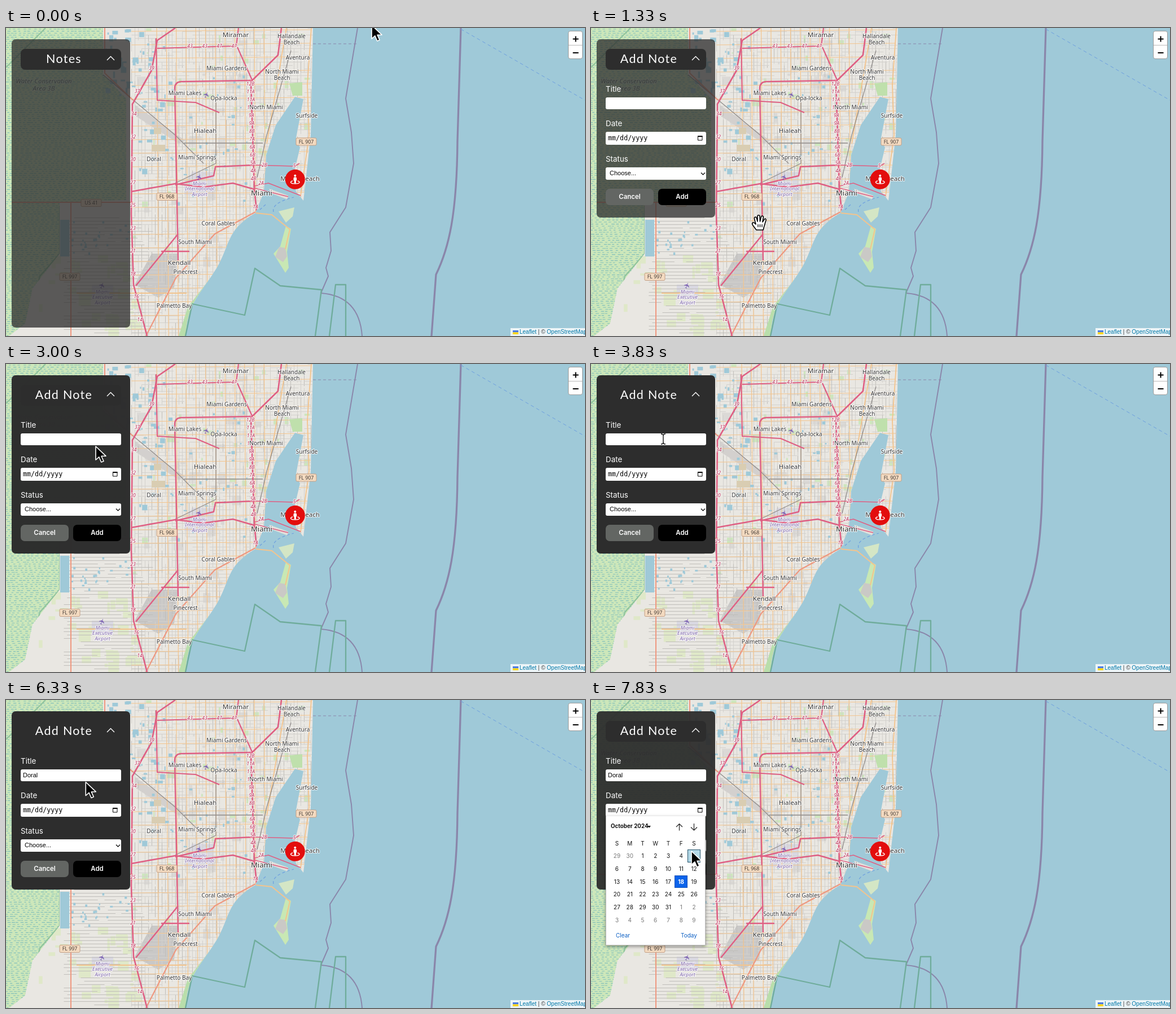
Write an HTML page with a canvas that moves like this. It is 1026x546 px and loops after 8 s.

```html
<!DOCTYPE html>
<html lang="en">
<head>
<meta charset="utf-8">
<title>Map notes</title>
<style>
html, body { margin: 0; width: 100%; height: 100%; overflow: hidden; }
body { position: relative; background: #9fc9d8; font: 13.4px Inter, sans-serif; color: #fff; }
body *, canvas { position: absolute; box-sizing: border-box; }
svg { left: 0; top: 0; }
#panel { left: 10px; top: 20px; width: 210px; border-radius: 7px; }
#head { left: 16px; top: 17px; width: 178px; height: 37px; border-radius: 8px; background: #2d2d2d; }
#name { width: 153px; text-align: center; font: 21.5px/35px Lato, cursive; letter-spacing: 1.3px; white-space: nowrap; }
#form { width: 210px; height: 316px; }
#form > * { left: 16px; line-height: 20px; }
#form .in { width: 178px; height: 22px; border-radius: 3px; background: #fff; color: #000; padding-left: 4px; font: 11px/21px "Liberation Sans", Arial, sans-serif; }
#form .btn { top: 265px; width: 85px; height: 29px; border-radius: 7px; text-align: center; font: 600 11.5px/29px Inter, sans-serif; }
#form .date { height: 23px; font: 11.7px/23px "DejaVu Sans Mono", monospace; }
#caret { width: 1px; height: 13px; top: 4px; background: #000; }
#typed { position: static; }
#cal { left: 26px; top: 206px; width: 177px; height: 229px; background: #fff; color: #111; border: 1px solid #bbb; border-top: 0; box-shadow: 0 2px 6px #0006; font: 10px Inter, sans-serif; }
#cal b { left: 8px; top: 12px; white-space: nowrap; font-size: 9.8px; }
#days { left: 7.6px; top: 36.6px; display: grid; grid: auto / repeat(7, 22.75px); grid-auto-rows: 22.75px; }
#days span { position: static; text-align: center; line-height: 22.5px; }
#days .out { color: #777; }
#days .now { background: #0b63ea; color: #fff; font-weight: 700; border: 1px solid #0a4fb8; line-height: 20px; }
#days .hot { background: #b3d8e6; border: 1px solid #23526a; line-height: 20px; }
.link { top: 205px; color: #0b5fc4; }
#zoom { left: 996px; top: 5px; width: 26px; height: 50px; border: 1px solid #9a9a9a; border-radius: 4px; background: #fff; }
#credit { left: 894px; top: 532px; width: 140px; height: 14px; background: #fffc; color: #333; font: 10px/14px "Liberation Sans", Arial, sans-serif; white-space: nowrap; }
#credit b { font-weight: 400; position: static; color: #0078a8; }
#credit span { left: 16px; }
</style>
</head>
<body>
<canvas id="map" width="1026" height="546"></canvas>
<svg width="1026" height="546">
  <circle cx="512.3" cy="268.3" r="17.5" fill="#e30d0d"/>
  <g fill="#fff"><circle cx="512.3" cy="261.8" r="2"/><path d="M509.500 266q0-1.800 2.800-1.800t2.800 1.800v4l-1.200 1v4h-3.200v-4l-1.200-1z"/></g>
  <path d="M508 271c-6 1.500-4 5 4.300 5s10.300-3.500 4.300-5" fill="none" stroke="#fff" stroke-width="1.4"/>
</svg>
<div id="zoom"><svg width="24" height="48" fill="none" stroke="#000" stroke-width="2"><path d="M7.500 13.500h10M12.500 8.500v10M7.500 38h10"/><path d="M0 24.500h24" stroke="#bbb" stroke-width="1"/></svg></div>
<div id="credit"><svg width="14" height="14" style="left:4px"><path d="M0 4h10v3.500H0z" fill="#4c7be1"/><path d="M0 7.500h10v3.500H0z" fill="#ffd500"/></svg><span><b>Leaflet</b> | © <b>OpenStreetMap</b></span></div>

<div id="panel">
  <div id="head"><div id="name"></div>
    <svg width="178" height="37" fill="none" stroke="#fff" stroke-width="1.4"><path d="M153 20l6.500-6.500 6.500 6.500"/></svg></div>
  <div id="form">
    <div style="top:78px">Title</div>
    <div class="in" style="top:103px;height:21px"><span id="typed"></span><i id="caret"></i></div>
    <div style="top:139px">Date</div>
    <div class="in date" style="top:164px">mm/dd/yyyy
      <svg width="178" height="22" fill="none" stroke="#000"><path d="M163.500 7.500h7.500v7.500h-7.500z"/><path d="M163 8h8.500" stroke-width="2"/></svg></div>
    <div style="top:202px">Status</div>
    <div class="in" style="top:227px;padding-left:7px">Choose...
      <svg width="178" height="22" fill="none" stroke="#111" stroke-width="1.3"><path d="M169 9.500l3.500 3.500 3.500-3.500"/></svg></div>
    <div class="btn" style="background:#636663">Cancel</div>
    <div class="btn" style="left:109px;background:#000">Add</div>
  </div>
</div>

<div id="cal">
  <b>October 2024</b>
  <svg width="176" height="36" fill="none" stroke="#222" stroke-width="1.2"><path d="M73 17h6l-3 3.500z" fill="#000" stroke="none"/><path d="M129.500 25.500v-12m-5.500 5.500l5.500-5.500 5.500 5.500M155.500 13v12m-5.500-5.500l5.500 5.500 5.500-5.500"/></svg>
  <div id="days"></div>
  <span class="link" style="left:17px">Clear</span><span class="link" style="left:132px">Today</span>
</div>

<svg width="1026" height="546" stroke-linejoin="round">
  <path id="arrow" d="M0 0v24l5.800-5.200 4 9.200 4.200-1.800-4-9h8z" fill="#000" stroke="#fff" stroke-width="1.6"/>
  <g id="hand" stroke="#000" stroke-width="1.6">
    <path d="M-5 13L-11 5C-14 1-11-2-8 1L-6 3-8.500-7C-9-10-5.500-11-4.500-8L-3-2V-11C-3-14 1-14 1-11L1.500-2 3.500-10C4.500-13 8-12 7.300-9L6-1 9-5.500C10.500-8 13-6.500 12-4L9 6 7 13Z" fill="#fff"/>
    <path d="M-2 3v5m3.500-5v5m3.500-5v5" fill="none" stroke-width="1.3"/>
  </g>
  <path id="beam" d="M-4-9q4 0 4 3v12q0 3-4 3M4-9q-4 0-4 3v12q0 3 4 3" fill="none" stroke="#000" stroke-width="1.3"/>
</svg>

<script>
const $ = id => document.getElementById(id);
const g = $('map').getContext('2d');
let seed = 7;
const rnd = (a, b) => {
  seed = seed * 16807 % 2147483647;
  return a + (b - a) * seed / 2147483647;
};
const fill = (d, color) => { g.fillStyle = color; g.fill(new Path2D(d)); };
const line = (d, color, width, dash = []) => {
  g.strokeStyle = color; g.lineWidth = width; g.setLineDash(dash);
  g.stroke(new Path2D(d));
};
const scatter = (count, x0, y0, x1, y1, max, color) => {
  g.fillStyle = color;
  while (count--) g.fillRect(rnd(x0, x1), rnd(y0, y1), rnd(2, max), rnd(2, max));
};
const clipped = (d, draw) => { g.save(); g.clip(new Path2D(d)); draw(); g.restore(); };

const WATER = '#9fc9d8', PINK = '#df5f83', ORANGE = '#f3c48d', SALMON = '#ee9880', PURPLE = '#8a86aa', BLUE = '#6d9fdf';
const LAND = 'M0 0H544L540 190 527 306 514 290 509 262 521 212 514 195 527 126 512 122 478 172 461 225 457 290 442 328C385 360 400 390 364 440S322 500 318 546H0Z';
const WETLAND = 'M0 0H172V82L213 125V305L95 309V400L47 462 34 524 6 546H0Z';

function streets() {
  for (let i = 0; i < 2600; i++) {
    const west = i % 6 == 0, len = rnd(10, 45);
    const x = Math.round((west ? rnd(100, 225) : rnd(222, 540)) / 6) * 6 + .5;
    const y = Math.round((west ? rnd(335, 546) : rnd(0, 546)) / 6) * 6 + .5;
    line(`M${x} ${y}${i % 2 ? 'v' : 'h'}${len}`, i % 3 ? '#d3d1cd' : '#c0beba', 1);
  }
  for (let y = 6; y < 546; y += 24) line(`M222 ${y}L540 ${y - 3}`, ORANGE, 1.2);
  for (let x = 267; x < 470; x += 17.3) line(`M${x} 0l4 546`, ORANGE, 1.2);
  line('M541 0L534 100 537 190 522 298M497 0L462 205M125 470H320', ORANGE, 1.8);
}

function wetland() {
  fill(WETLAND, '#cde7ba');
  for (let y = 2; y < 546; y += 3.6)
    for (let x = rnd(-5, 3); x < 220; x += rnd(6, 11))
      line(`M${x} ${y}h${rnd(3, 6)}`, '#82bfba', 1.1);
  line('M0 70L70 0M42 546V520L60 440 95 400V315', '#8fc39b', 2);
}

function land() {
  g.fillStyle = '#e9e7e2';
  g.fillRect(0, 0, 546, 546);
  scatter(60, 225, 0, 530, 400, 14, '#cde6bd');
  scatter(40, 50, 400, 230, 546, 22, '#dfe8c8');
  scatter(40, 225, 0, 440, 500, 20, '#dbd9d6');
  fill('M258 400H305L298 460 270 478 228 455Z', '#c9c8c7');
  fill('M228 136L318 200 306 205 228 155Z', '#d3d0ce');
  fill('M330 255H368V296H316V276ZM152 455H190V480H152Z', '#d9d8e2');
  streets();
  clipped(WETLAND, wetland);
  scatter(28, 176, 0, 218, 128, 13, WATER);
  scatter(40, 222, 5, 288, 270, 10, WATER);
  scatter(30, 290, 60, 430, 310, 6, WATER);
  scatter(30, 100, 342, 222, 398, 5, WATER);
  fill('M96 340h16v65h-16z', WATER);
  fill('M258 207h24v12h-24zM262 177h13v11h-13z', '#d9cdb2');
  fill('M502 98L525 96V120H508Z', '#bfe0ac');
  fill('M366 438L322 495 306 546H400Z', '#b9deab');
  line('M172 83L300 190 350 240M505 40L462 190 445 265M372 130V240L300 275M315 204H455', '#918d8b', 1.3);
  line('M115 310V546M10 309H225M175 0V80L225 128', SALMON, 2);
  line('M442 326L370 365 301 443 248 546', SALMON, 2.2);
  line('M300 0L268 22 258 75 224 135 222 330 226 455 250 546', PINK, 2.6);
  line('M266 18L268 128 336 132 378 150M268 36L408 32 412 0M410 34L436 92', PINK, 2.2);
  line('M488 0L482 48 434 95 440 285 444 324', PINK, 2.6);
  line('M434 93L310 95Q299 96 299 107L305 412M305 365L230 457M275 396H325', PINK, 2.4);
  line('M222 290L300 276 350 282 402 275 440 286M300 278L368 262 371 246 438 243', PINK, 2.4);
}

function sea() {
  fill('M483 325L511 318 508 334 496 345Z', '#d4e6c5');
  fill('M496 351L505 356 498 397 501 425 495 434 474 400 486 387Z', '#c8e8b4');
  fill('M484 388L495 390 498 405 491 415 477 406Z', '#cac9c6');
  fill('M466 285L500 297 499 304 470 293Z', '#e2dfda');
  line('M440 243L512 245 520 240M441 280L465 275 522 297M441 284L500 299', PINK, 1.5);
  line('M443 328L471 331 503 357 495 392', ORANGE, 2);
  line('M474 326Q470 310 510 300M460 313L450 322', BLUE, 1.2, [5, 4]);
  line('M623 0L602 125 612 185 616 240 602 318 574 362 576 395 567 425 571 440 558 470Q626 475 631 546', PURPLE, 1.9);
  line('M806 0L800 200C799 330 785 390 762 437L754 546', PURPLE, 3.3);
  line('M544 28H621', PURPLE, 1, [5, 4]);
  line('M806 2L1026 128', BLUE, 1, [6, 5]);
  line('M318 546L330 489 423 509 441 426 486 457 559 464 548 546M573 546L584 455H602V546', '#6fac9b', 2.3);
}

function text(s, x, y, size = 10, color = '#333', style = '', halo = '#fffc') {
  g.font = `${style} ${size}px "Noto Sans", sans-serif`;
  g.textAlign = 'center'; g.textBaseline = 'middle';
  g.setLineDash([]); g.lineWidth = 2.2; g.strokeStyle = halo; g.fillStyle = color;
  s.split('|').forEach((row, i) => {
    g.strokeText(row, x, y + i * size * 1.13);
    g.fillText(row, x, y + i * size * 1.13);
  });
}
const exit = (s, x, y) => text(s, x, y, 8.6, '#b62850', 'italic 500');

function airport(s, x, y) {
  text(s, x, y, 8.8, '#7960a8', 'italic');
  plane(x, y - 11);
}
function plane(x, y) {
  g.save();
  g.translate(x, y); g.rotate(-1.2);
  text('✈', 0, 0, 14, '#7c62b4', '', '#0000');
  g.restore();
}

function shield(s, x, y) {
  g.beginPath();
  g.roundRect(x - 18, y - 6.5, 36, 13, 2);
  g.fillStyle = '#f3dac0'; g.fill();
  g.strokeStyle = '#c39f86'; g.lineWidth = 1; g.stroke();
  text(s, x, y + .5, 8.8, '#423a35', '500', '#0000');
}

function labels() {
  for (let i = 0; i < 12; i++)
    exit(`${39 - Math.round(i * 2.3)}`, 225 + 33 * Math.exp(-1.5 * i) + Math.max(0, i - 9) * 6, 72 + i * 40.5);
  for (let i = 0; i < 13; i++)
    exit(Math.round(12 - i * .7) + (i % 3 ? 'A' : 'B'), 433 + i * .45, 100 + i * 14);
  for (let i = 0; i < 4; i++) exit(i < 2 ? '43' : '47', 326 + i * 26, 33);
  exit('2B', 458, 244); exit('5', 511, 245); exit('2A', 452, 276); exit('1A', 442, 318);

  const towns = 'Hallandale|Beach/506/15,Aventura/517/53,Miami Gardens/391/72,North Miami|Beach/489/78,Miami Lakes/317/116,Opa-locka/386/125,North Miami/461/141,Surfside/533/156,Doral/262/233,Miami Springs/339/230,Coral Gables/376/347,South Miami/335/380,Pinecrest/318/433,Palmetto Bay/298/493';
  for (const town of towns.split(',')) {
    const [s, x, y] = town.split('/');
    text(s, +x, +y);
  }
  text('Miramar', 407, 13, 11.6);
  text('Hialeah', 353, 183, 11.4);
  text('Kendall', 307, 417, 11.6);
  text('Miami', 453, 293, 13);
  text('Miami Beach', 521, 268, 11.5);
  text('Water Conservation|Area 3B', 67, 95, 11.4, '#536b61', 'italic', '#fff6');
  airport('Miami|International|Airport', 343, 276);
  airport('Miami|Executive|Airport', 171, 468);
  plane(356, 119);
  shield('FL 907', 532, 201.5);
  shield('FL 968', 285, 299);
  shield('FL 997', 113, 441);
  shield('US 41', 151, 310);
}

g.lineJoin = 'round';
g.fillStyle = WATER;
g.fillRect(0, 0, 1026, 546);
clipped(LAND, land);
sea();
labels();

$('days').innerHTML = [...'SMTWTFS'].map(d => `<span>${d}</span>`).join('') +
  Array.from({ length: 42 }, (_, i) =>
    `<span class="${i < 2 || i > 32 ? 'out' : i == 19 ? 'now' : ''}">${new Date(2024, 8, 29 + i).getDate()}</span>`).join('');
const hotDay = $('days').children[13];

// Six steps per second; each stop of the pointer is [step, x, y]
const STOPS = [[0, 648, -5], [6, 298, 345], [8, 298, 345], [14, 222, 202], [16, 222, 202], [18, 159, 146], [20, 128, 133], [36, 128, 133], [43, 195, 196], [46, 195, 196], [47, 178, 268]];
const smooth = u => { u = Math.min(1, Math.max(0, u)); return u * u * (3 - 2 * u); };
function pointer(n) {
  let [[, x, y]] = STOPS;
  for (let i = 1; i < STOPS.length; i++) {
    const [from, x0, y0] = STOPS[i - 1], [to, x1, y1] = STOPS[i];
    const e = smooth((n - from) / (to - from));
    x += (x1 - x0) * e;
    y += (y1 - y0) * e;
  }
  return [x, y];
}
const show = (id, on) => { $(id).style.display = on ? '' : 'none'; };

function render(n) {
  const form = n >= 6;
  const shade = .76 + .24 * smooth((n - 16) / 2.3) - .055 * smooth(n - 46);
  $('panel').style.height = (form ? 316 : 511) + 'px';
  $('panel').style.background = `rgba(45,45,45,${shade})`;
  $('name').textContent = form ? 'Add Note' : 'Notes';
  show('form', form);

  const typing = n >= 31;
  $('typed').textContent = typing ? 'Doral'.slice(0, 3 + Math.floor((n - 31) / 1.5)) : '';
  const blink = (n - (n < 34 ? 20 : 34)) % 6 < 3;
  show('caret', n >= 20 && n < 43 && (blink || typing && n < 34));
  show('cal', n >= 46);
  hotDay.className = n >= 47 ? 'hot' : '';

  const kind = n > 0 && n < 17 ? 'hand' : n > 18 && n < 38 ? 'beam' : 'arrow';
  const hidden = typing && n < 37;
  for (const id of ['arrow', 'hand', 'beam']) {
    show(id, id == kind && !hidden);
    $(id).setAttribute('transform', `translate(${pointer(n)})`);
  }
}

const start = performance.now();
function tick(now) {
  const t = Math.max(0, now - start) % 8000;
  render(Math.floor(t * .006 + .03) % 48);
  requestAnimationFrame(tick);
}
render(0);
requestAnimationFrame(tick);
</script>
</body>
</html>
```
